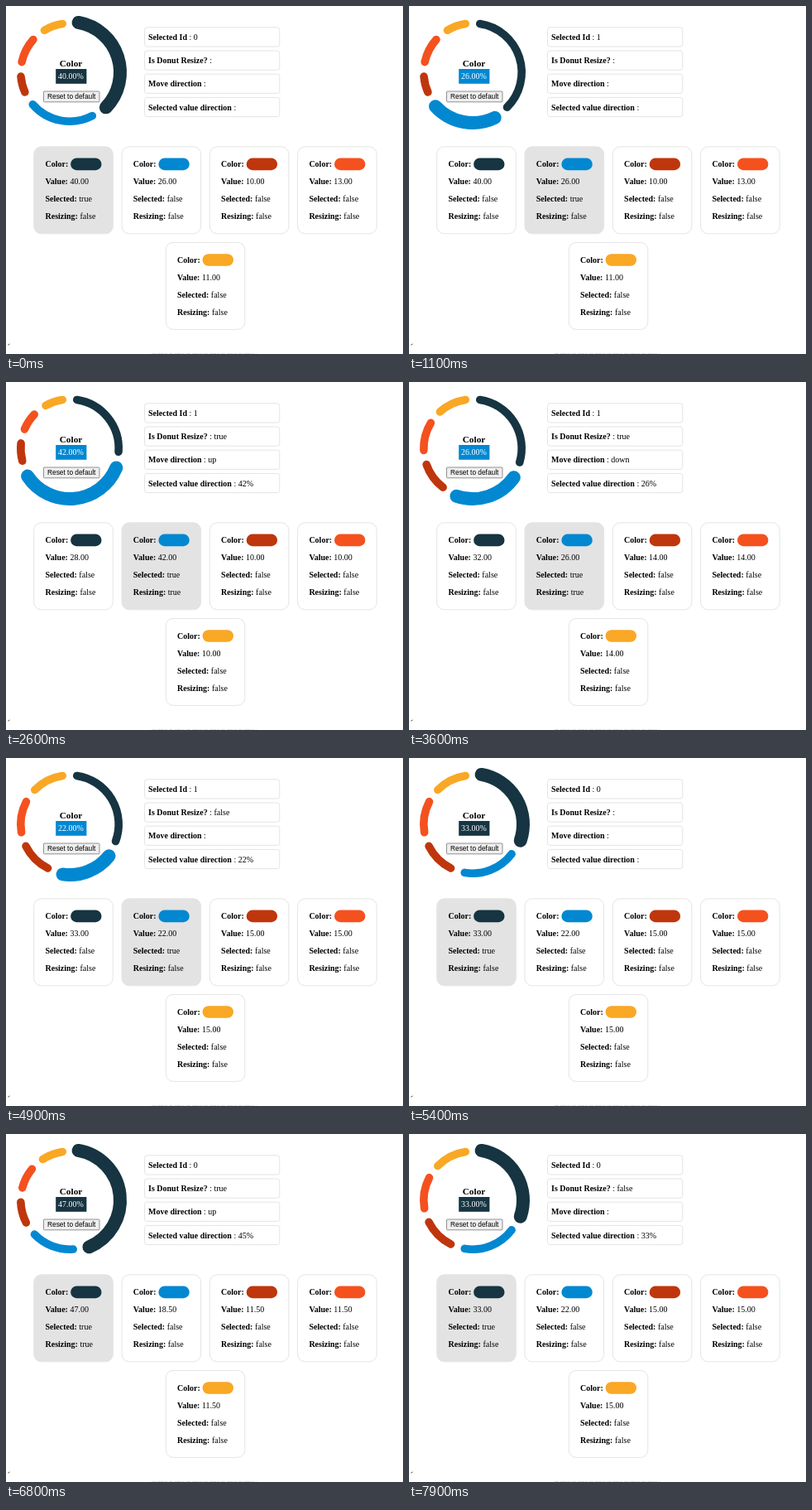
Recreate the animation shown at these times as an HTML page. Size 480 by 420 pixels, loop 8 s.

```html
<!DOCTYPE html>
<html lang="en">
<head>
<meta charset="utf-8">
<title>Resizable donut</title>
<style>
html, body { margin: 0; width: 100%; height: 100%; overflow: hidden; background: #fff; }
svg { display: block; font: 10px "Liberation Serif", "Times New Roman", serif; }
.b { font-weight: bold; }
.row, .card { fill: #fff; stroke: #e4e4e4; }
.card.on { fill: #e3e3e3; }
.title { font-size: 11.25px; font-weight: bold; text-anchor: middle; }
.percent { fill: #fff; text-anchor: middle; }
.button { font: 8.33px "Liberation Sans", Arial, sans-serif; text-anchor: middle; }
</style>
</head>
<body>
<svg id="stage" width="480" height="420" viewBox="0 0 480 420"></svg>
<script>
const LOOP = 8000, MIN = 10, CX = 77, CY = 80;
const COLORS = ['#163441', '#0288d1', '#bf360c', '#f4511e', '#f9a825'];
const stage = document.getElementById('stage');

// Drag moves: [time, dragged segment, its new value, delay of the labels, shown direction value]
const MOVES = [
  [1500, 1, 29], [1600, 1, 32], [1700, 1, 35], [1800, 1, 38], [1900, 1, 40], [2000, 1, 42],
  [2600, 1, 40], [2700, 1, 37], [2800, 1, 34], [2900, 1, 31], [3200, 1, 30, 0],
  [3400, 1, 28], [3500, 1, 26], [3800, 1, 24], [4100, 1, 22, 0],
  [5900, 0, 36], [6000, 0, 39], [6100, 0, 42], [6200, 0, 45], [6300, 0, 47, 100, 45],
  [6800, 0, 46.5], [6900, 0, 43], [7000, 0, 40], [7100, 0, 37], [7200, 0, 34], [7800, 0, 33]
];

// Give segment i the value v; the others share the difference, none below MIN.
function resize(values, i, v) {
  const out = [...values];
  let rest = v - out[i];
  out[i] = v;
  while (Math.abs(rest) > 1e-6) {
    const open = out.map((_, k) => k).filter(k => k !== i && (rest < 0 || out[k] > MIN + 1e-6));
    const share = Math.min(rest / open.length, ...open.map(k => out[k] - MIN + (rest < 0 ? 1e3 : 0)));
    open.forEach(k => out[k] -= share);
    rest -= share * open.length;
  }
  return out;
}

const states = [{ at: 0, textAt: 0, values: [40, 26, 10, 13, 11], dir: '', move: '' }];
for (const [at, i, v, delay = 100, dir = v] of MOVES) {
  const last = states[states.length - 1].values;
  states.push({
    at, textAt: at + delay, values: resize(last, i, v),
    dir: Math.round(dir) + '%', move: v > last[i] ? 'up' : 'down'
  });
}
const stateAt = (key, t) => states.filter(s => s[key] <= t).pop();
const within = (t, a, b) => t >= a && t < b;

function arc(from, to, color, thick) {
  const r = thick ? 61 : 59.2, gap = thick ? 10 : 8.5;
  const point = deg => {
    const a = deg * Math.PI / 180;
    return `${CX + r * Math.sin(a)} ${CY - r * Math.cos(a)}`;
  };
  const a = from + gap, b = to - gap;
  return `<path d="M${point(a)}A${r} ${r} 0 ${b - a > 180 ? 1 : 0} 1 ${point(b)}" fill="none"
    stroke="${color}" stroke-width="${thick ? 16 : 9.6}" stroke-linecap="round"/>`;
}

function donut(values, thick) {
  let from = 0;
  return values.map((v, i) => {
    const to = from + v * 3.6, path = arc(from, to, COLORS[i], thick(i));
    from = to;
    return path;
  }).join('');
}

const field = (x, y, label, value) =>
  `<text x="${x}" y="${y}"><tspan class="b">${label}</tspan> ${value}</text>`;

const row = (i, label, value) => {
  const y = 25.8 + i * 28.2;
  return `<rect class="row" x="167.5" y="${y}" width="163.3" height="23.2" rx="3"/>` +
    field(172, y + 15.2, label, ': ' + value);
};

function card(i, value, selected, resizing) {
  const x = i < 4 ? 33.7 + i * 106.3 : 193.2, y = i < 4 ? 169.8 : 285.4, tx = x + 13.8;
  return `<rect class="card ${selected ? 'on' : ''}" x="${x}" y="${y}" width="95.6" height="105" rx="9"/>` +
    field(tx, y + 24.2, 'Color:', '') +
    `<rect x="${x + 44.4}" y="${y + 13.8}" width="37.4" height="14.6" rx="7.3" fill="${COLORS[i]}"/>` +
    field(tx, y + 45.2, 'Value:', value.toFixed(2)) +
    field(tx, y + 66.2, 'Selected:', selected) +
    field(tx, y + 87.2, 'Resizing:', resizing);
}

function draw(t) {
  const shape = stateAt('at', t), text = stateAt('textAt', t);
  const selected = within(t, 1100, 5400) ? 1 : 0;
  const hovered = within(t, 900, 1100) ? 1 : within(t, 5200, 5400) ? 0 : selected;
  const dragging = within(t, 1500, 4600) || within(t, 5900, 7900);
  const touched = within(t, 1500, 5400) || t >= 5900;
  const fresh = touched && text.values[selected] !== undefined &&
    (selected === 1 ? t >= 1600 : t >= 6000);
  return donut(shape.values, i => i === selected || i === hovered) +
    `<text class="title" x="78.5" y="73">Color</text>
    <rect x="60.2" y="76" width="37.2" height="17.8" fill="${COLORS[selected]}"/>
    <text class="percent" x="78.5" y="88.2">${text.values[selected].toFixed(2)}%</text>
    <rect x="45.5" y="103" width="67.5" height="12.8" rx="1" fill="#efefef" stroke="#777" stroke-width=".8"/>
    <text class="button" x="79.2" y="112.3">Reset to default</text>` +
    row(0, 'Selected Id', selected) +
    row(1, 'Is Donut Resize?', touched ? dragging : '') +
    row(2, 'Move direction', dragging && fresh ? text.move : '') +
    row(3, 'Selected value direction', fresh ? text.dir : '') +
    text.values.map((v, i) => card(i, v, i === selected, dragging && i === selected)).join('') +
    `<path d="M2.3 409.3L4.5 407.8" stroke="#555"/>
    <path d="M176 419.5H303" stroke="#ddd" stroke-dasharray="5 2 8 1 3 2"/>`;
}

let shown = '';
function tick() {
  const svg = draw(performance.now() % LOOP);
  if (svg !== shown) stage.innerHTML = shown = svg;
  requestAnimationFrame(tick);
}
tick();
</script>
</body>
</html>
```
